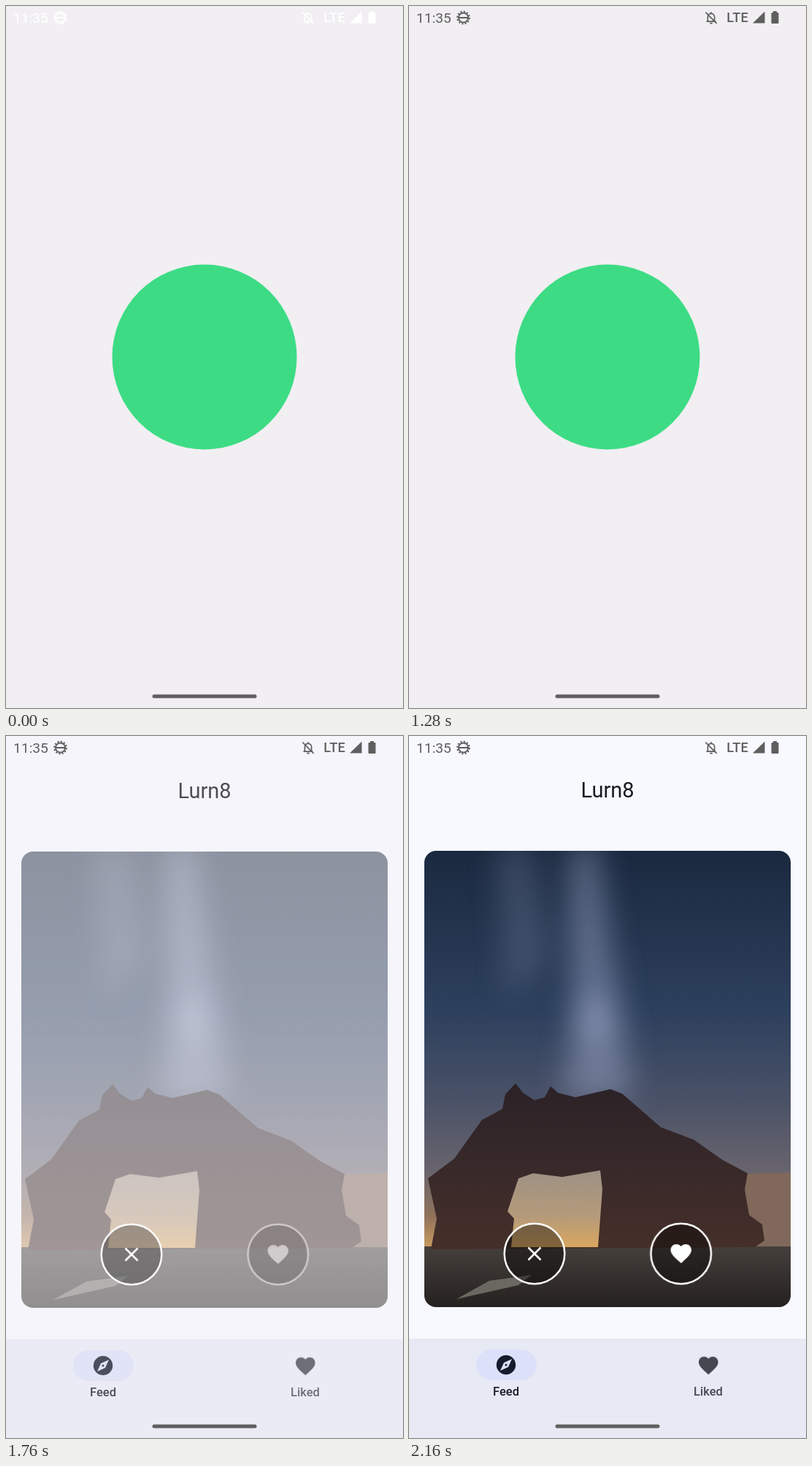
Animation of 544 by 960 pixels, one loop 2200 ms. Source, as an HTML page:

```html
<!DOCTYPE html>
<html lang="en">
<head>
<meta charset="utf-8">
<title>App launch</title>
<style>
  html, body { margin: 0; width: 100%; height: 100%; overflow: hidden; background: #f1eff2; }
  svg { display: block; width: 544px; height: 960px; font-family: Roboto, sans-serif; }
  text { text-anchor: middle; }
  .medium { font-weight: 500; }
  #status { color: #5f5f5f; fill: currentColor; }
  .line { fill: none; stroke: currentColor; }
</style>
</head>
<body>
<svg viewBox="0 0 544 960">
  <defs>
    <linearGradient id="sky" x2="0" y2="1">
      <stop offset="0" stop-color="#1a293f"/>
      <stop offset=".35" stop-color="#2d405d"/>
      <stop offset=".55" stop-color="#4a5267"/>
      <stop offset=".7" stop-color="#68646d"/>
      <stop offset=".8" stop-color="#90725b"/>
      <stop offset=".87" stop-color="#c89a60"/>
    </linearGradient>
    <linearGradient id="rock" x2="0" y2="1">
      <stop offset="0" stop-color="#2b2227"/>
      <stop offset=".5" stop-color="#38292a"/>
      <stop offset="1" stop-color="#452f29"/>
    </linearGradient>
    <linearGradient id="cave" x2="0" y2="1">
      <stop offset="0" stop-color="#9d9184"/>
      <stop offset=".6" stop-color="#b59a7a"/>
      <stop offset="1" stop-color="#d9a760"/>
    </linearGradient>
    <linearGradient id="ground" x2="0" y2="1">
      <stop offset="0" stop-color="#45403c"/>
      <stop offset="1" stop-color="#25211f"/>
    </linearGradient>
    <filter id="soft" x="-100%" y="-50%" width="300%" height="200%">
      <feGaussianBlur stdDeviation="20"/>
    </filter>
    <clipPath id="card"><rect x="21" y="157" width="502" height="624" rx="16"/></clipPath>
    <path id="heart" d="M0 9.15l-1.45-1.32C-6.6 3.16-10 .08-10-3.7c0-3.08 2.42-5.5 5.5-5.5 1.74 0 3.41.81 4.5 2.09C1.09-8.39 2.76-9.2 4.5-9.2c3.08 0 5.5 2.42 5.5 5.5 0 3.78-3.4 6.86-8.55 11.54z"/>
    <circle id="ring" r="41.3" fill="#000" fill-opacity=".4" stroke="#fff" stroke-width="2.5"/>
  </defs>

  <g id="app">
    <rect y="-20" width="544" height="1000" fill="#f8f8ff"/>
    <text x="272" y="84" font-size="29" fill="#191b23">Lurn8</text>

    <g id="photo" clip-path="url(#card)">
      <rect x="21" y="157" width="502" height="624" fill="url(#sky)"/>
      <g filter="url(#soft)" fill="#a9b1d3">
        <path d="M222 150h35l18 130 20 130 10 85h-95l18-110-8-120z" opacity=".45"/>
        <path d="M120 150h50l20 150-55 60z" opacity=".22"/>
        <ellipse cx="252" cy="388" rx="24" ry="30" opacity=".5"/>
      </g>
      <path d="M455 599l68-2v110h-68z" fill="#80695a"/>
      <path d="M21 698h502v83H21z" fill="url(#ground)"/>
      <path d="M26 605L62 578 100 525 128 510 132 490 146 475 156 488 172 498 186 494 194 479 204 488 228 494 276 483 292 489 345 535 390 552 430 580 464 598 460 620 466 655 484 668 487 690 474 699 30 702 38 660z" fill="url(#rock)"/>
      <path d="M135 650L150 605 170 598 210 603 262 594 265 620 259 699H140L144 660z" fill="url(#cave)"/>
      <path d="M65 770L110 745 168 737 150 751z" fill="#696961"/>
    </g>

    <g transform="translate(172 708)">
      <use href="#ring"/>
      <path d="M-8.5-8.5l17 17m0-17l-17 17" stroke="#fff" stroke-width="2.6"/>
    </g>
    <g id="like" transform="translate(372.7 708)">
      <use href="#ring"/>
      <use href="#heart" transform="scale(1.42)" fill="#fff"/>
    </g>

    <rect y="824" width="544" height="160" fill="#e7eaf5"/>
    <rect x="92" y="839" width="83" height="42" rx="21" fill="#dce0f9"/>
    <circle cx="133" cy="860" r="13.2" fill="#161b2c"/>
    <path d="M141 852l-5 11-11 5 5-11z" fill="#dce0f9"/>
    <circle cx="133" cy="860" r="1.5" fill="#161b2c"/>
    <use href="#heart" transform="translate(410.3 861) scale(1.33)" fill="#44474f"/>
    <g class="medium" font-size="16.5">
      <text x="133" y="902" fill="#191b23">Feed</text>
      <text x="410" y="902" fill="#44474f">Liked</text>
    </g>
  </g>

  <g id="splash">
    <rect width="544" height="960" fill="#f1eff2"/>
    <circle id="icon" cx="272" cy="480" r="126.5" fill="#3ddc84"/>
  </g>

  <g id="status">
    <text x="34" y="23" font-size="19.2">11:35</text>
    <g class="line" transform="translate(74.5 16)" stroke-width="2">
      <circle r="6.6"/>
      <circle r="8.4" stroke-dasharray="2.2 2.2"/>
      <path d="M-6.5 0h13"/>
    </g>
    <g class="line" transform="translate(414 16)" stroke-width="1.7">
      <path d="M-6.5 5.2H6.5M-4.6 5V-1C-4.6-4-2.5-5.6 0-5.6S4.6-4 4.6-1V5M0-5.6v-2.2M-1.8 7.6h3.6M-7.6-7.4L7.6 7.8"/>
    </g>
    <text class="medium" x="450" y="22" font-size="18.2">LTE</text>
    <path d="M471 23.5h16.5V7.5zM496.500 10q0-1 1-1h1.500V7h5v2h1.500q1 0 1 1v13q0 1-1 1h-8q-1 0-1-1z"/>
  </g>
  <rect x="200.500" y="941.500" width="143" height="5" rx="2.500" fill="#5f5f5f"/>
</svg>
<script>
  const LOOP = 2200;

  // Each step is [time in ms, value]; values hold before the first and after the last.
  function track(id, prop, steps) {
    const frames = steps.map(([ms, value]) => ({ offset: ms / LOOP, [prop]: value }));
    frames.unshift({ ...frames[0], offset: 0 });
    frames.push({ ...frames[frames.length - 1], offset: 1 });
    const anim = document.getElementById(id)
      .animate(frames, { duration: LOOP, iterations: Infinity });
    anim.startTime = document.timeline.currentTime;
  }

  const slide = y => `translateY(${y}px)`;

  track('status', 'color', [[40, '#ffffff'], [240, '#5f5f5f']]);
  track('icon', 'opacity', [[1490, 1], [1678, 0]]);
  track('splash', 'opacity', [[1640, 1], [1760, .25], [1800, .07], [1840, 0]]);
  track('app', 'transform', [[1640, slide(6)], [1720, slide(2.5)], [1760, slide(1)], [1840, slide(0)]]);
  track('photo', 'opacity', [[1600, 0], [1760, .63], [1840, .94], [1880, 1]]);
  track('like', 'opacity', [[1600, 0], [1760, .5], [1840, .74], [1960, 1]]);
</script>
</body>
</html>
```
